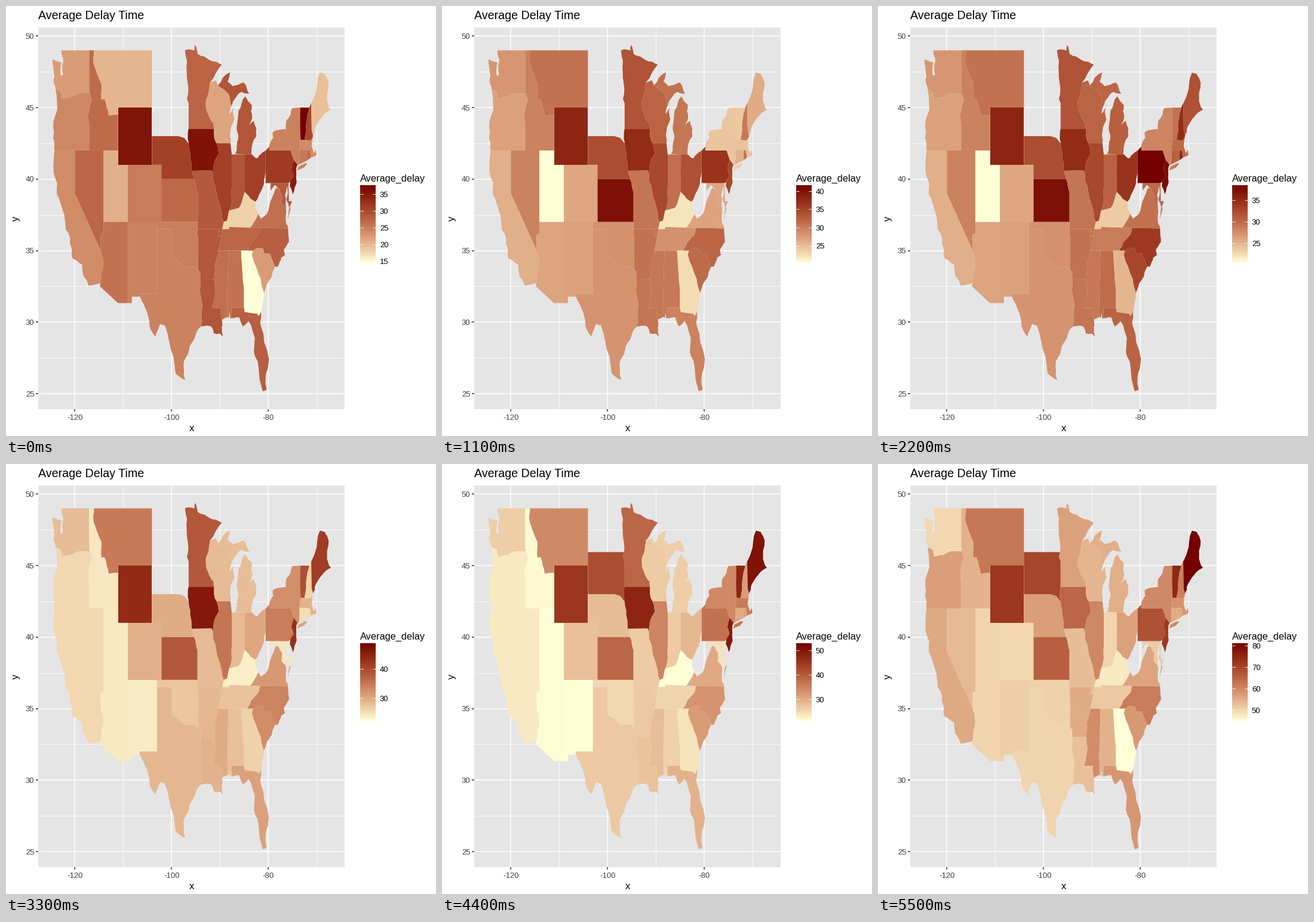
These frames come from a looping animation (720 px wide and 720 px high, 6600 ms). A matplotlib script:

```python
import numpy as np
import matplotlib.pyplot as plt
from matplotlib.animation import FuncAnimation
from matplotlib.collections import LineCollection
from matplotlib.patches import Polygon, Rectangle

SIZE, DPI = 720, 100
BAR = (593, 619, 430, 300)  # left, right, bottom, top of the colour bar

# lowest delay, highest delay, legend step for each period
PERIODS = [(14.46, 37.7, 5), (20.4, 41.6, 5), (20.4, 38.5, 5),
           (22.4, 48.7, 10), (21.2, 52.9, 10), (45.0, 81.1, 10)]

rng = np.random.default_rng(7)
plt.rcParams["font.family"] = "Liberation Sans"
fig = plt.figure(figsize=(SIZE / DPI, SIZE / DPI), dpi=DPI, facecolor="white")
ax = fig.add_axes([0, 0, 1, 1])
ax.axis("off")


def px(lon):
    return 277.1 + 8.09 * (lon + 100)


def py(lat):
    return 50.3 + 23.95 * (50 - lat)


# ---- colour scale: light yellow to dark red through Lab ----
RGB_XYZ = np.array([[.4124, .3576, .1805], [.2126, .7152, .0722], [.0193, .1192, .9505]])
WHITE = RGB_XYZ.sum(axis=1)


def to_lab(rgb):
    c = np.array(rgb) / 255
    lin = np.where(c > .04045, ((c + .055) / 1.055) ** 2.4, c / 12.92)
    t = RGB_XYZ @ lin / WHITE
    f = np.where(t > .008856, np.cbrt(t), 7.787 * t + 16 / 116)
    return np.array([116 * f[1] - 16, 500 * (f[0] - f[1]), 200 * (f[1] - f[2])])


def to_rgb(lab):
    fy = (lab[0] + 16) / 116
    f = np.array([fy + lab[1] / 500, fy, fy - lab[2] / 200])
    t = np.where(f > .2069, f ** 3, (f - 16 / 116) / 7.787)
    lin = np.clip(np.linalg.solve(RGB_XYZ, t * WHITE), 0, 1)
    return np.where(lin > .0031308, 1.055 * lin ** (1 / 2.4) - .055, 12.92 * lin)


LOW, HIGH = to_lab((255, 255, 224)), to_lab((139, 0, 0))


def shade(percent):
    t = np.clip(percent / 100, 0, 1)
    return np.clip(to_rgb(LOW + (HIGH - LOW) * t), 0, 1) ** 1.3


# ---- borders: a few lon, lat key points, roughened by rule ----
def line(*v):
    lon, lat = np.reshape(v, (-1, 2)).T
    return np.c_[px(lon), py(lat)]


def ragged(p, amount, rounds=2):
    """Split every stretch in two and push the new point sideways."""
    for _ in range(rounds):
        step = np.diff(p, axis=0)
        normal = step[:, ::-1] * (-1, 1)
        mid = (p[1:] + p[:-1]) / 2 + normal * rng.uniform(-amount, amount, (len(step), 1))
        out = np.empty((2 * len(p) - 1, 2))
        out[::2], out[1::2] = p, mid
        p = out
    return p


def coast(*v):
    return ragged(line(*v), .1)


def river(*v):
    return ragged(line(*v), .06)


def box(west, north, east, south):
    return line(west, north, east, north, east, south, west, south)


def back(chain):
    return chain[::-1]


def ramp(x, a, b):
    return np.clip((x - a) / (b - a), 0, 1)


areas = []


def area(keys, *chains, start=0):
    """Keys are percent shades: first, early pair, late pair, last period.
    Within a pair the east darkens over time."""
    pts = np.vstack(chains)
    first, early, late, last = keys
    x = pts[:, 0].mean()
    d, e = 18 * ramp(x, 360, 520), 13 * ramp(x, 450, 500) - 3
    levels = (first, early - d, early + d, late - e, late + e, last)
    patch = ax.add_patch(Polygon(pts, lw=0, zorder=3))
    areas.append((patch, start, [shade(v) for v in levels]))


# West
sound = coast(-122.76, 49, -122.4, 48.2, -122.4, 47.3, -122.9, 47.2, -122.75, 48.15,
              -124.6, 48.37)
wa_coast = coast(-124.6, 48.37, -124.2, 47.2, -123.95, 46.25)
columbia = river(-123.95, 46.25, -122.9, 46.1, -122.6, 45.6, -120.6, 45.75, -118.98, 46)
wa_id = line(-117.03, 49, -117.03, 46.4, -116.92, 46)
or_coast = coast(-123.95, 46.25, -124.1, 44.4, -124.5, 42.85, -124.2, 42)
or_id = river(-116.92, 46, -116.5, 45.55, -117.2, 44.45, -117.03, 43.8)
ca_coast = coast(-124.2, 42, -124.4, 40.45, -123.7, 38.9, -122.5, 37.8, -121.9, 36.5,
                 -120.65, 35.15, -120.5, 34.45, -118.5, 34.03, -117.12, 32.53)
ca_nv = line(-120, 42, -120, 39, -114.63, 35)
ca_az = river(-114.72, 32.72, -114.5, 33.4, -114.15, 34.25, -114.63, 35)
nv_az = line(-114.63, 35, -114.7, 36.1, -114.05, 36.2, -114.05, 37)
id_mt = river(-116.05, 49, -116.05, 48, -114.5, 46.65, -114.5, 45.55, -113.9, 45.6,
              -113, 44.45, -111.05, 44.5)

area((34, 36, 19, 13), sound, wa_coast, columbia, back(wa_id))
area((42, 32, 10, 33), columbia, or_id, line(-117.03, 42), back(or_coast))
area((40, 27, 10, 29), ca_coast, ca_az, back(ca_nv))
area((55, 44, 10, 23), ca_nv, nv_az, line(-114.05, 42))
area((53, 44, 5, 26), wa_id, or_id, line(-117.03, 42, -111.05, 42), back(id_mt))
area((25, 50, 44, 48), id_mt, line(-111.05, 45, -104.05, 45, -104.05, 49))
area((92, 84, 79, 76), box(-111.05, 45, -104.05, 41))
area((27, 0, 4, 14), line(-114.05, 42, -111.05, 42, -111.05, 41),
     line(-109.05, 41, -109.05, 37, -114.05, 37))
area((46, 30, 24, 13), box(-109.05, 41, -102.05, 37))
area((50, 31, 4, 14), line(-114.05, 37, -109.05, 37, -109.05, 31.33, -111.07, 31.33,
                           -114.81, 32.5), ca_az, nv_az)
area((44, 32, 3, 16), line(-109.05, 37, -103, 37, -103, 32, -106.62, 32, -106.53, 31.78,
                           -108.2, 31.78, -108.2, 31.33, -109.05, 31.33))

# Plains
ne_sd = river(-98.5, 43, -97.3, 42.86, -96.45, 42.48)
ne_ia = river(-96.45, 42.48, -95.9, 41.2, -95.77, 40.58)
ne_mo = line(-95.77, 40.58, -95.3, 40)
ks_mo = river(-95.3, 40, -95, 39.6, -94.62, 39.1)
ok_ar = line(-94.62, 36.5, -94.43, 35.4, -94.48, 33.64)
red_river = river(-100, 34.56, -98.1, 34.1, -97.2, 33.85, -95.2, 33.9, -94.48, 33.64)
rio = river(-106.53, 31.78, -105, 30.65, -104.4, 29.55, -103.3, 29, -102.35, 29.87,
            -101.4, 29.78, -99.55, 27.55, -99.1, 26.4, -97.15, 25.95)
tx_coast = coast(-97.15, 25.95, -97.4, 27.3, -94.75, 29.35, -93.85, 29.7)
tx_ar = line(-94.48, 33.64, -94.04, 33.55, -94.04, 33.02)
tx_la = river(-94.04, 33.02, -94.02, 32, -93.55, 31.2, -93.85, 29.7)
nd_mn = river(-97.2, 49, -96.85, 47.5, -96.56, 45.94)
sd_mn = line(-96.56, 45.94, -96.8, 45.6, -96.45, 45.3, -96.45, 43.5)
sd_ia = river(-96.45, 43.5, -96.6, 43, -96.45, 42.48)

area((71, 66, 25, 33), line(-104.05, 43), ne_sd, ne_ia, ne_mo,
     line(-102.05, 40, -102.05, 41, -104.05, 41))
area((54, 94, 58, 58), line(-102.05, 40), ks_mo, line(-94.62, 37, -102.05, 37))
area((45, 38, 16, 15), line(-103, 37, -94.62, 37), ok_ar, back(red_river),
     line(-100, 36.5, -103, 36.5))
area((44, 37, 21, 14), line(-103, 36.5, -100, 36.5), red_river, tx_ar, tx_la,
     back(tx_coast), back(rio), line(-106.62, 32, -103, 32))
area((0, 0, 69, 69), line(-104.05, 45.94), sd_mn, sd_ia, back(ne_sd),
     line(-104.05, 43), start=4)

# Mississippi valley and lakes
mn_north = coast(-97.2, 49, -95.15, 49, -95.15, 49.38, -94.6, 48.75, -92, 48.3,
                 -89.6, 48, -92.05, 46.75)
mn_wi = river(-92.05, 46.75, -92.3, 46.1, -92.85, 45.6, -92.75, 44.8, -91.25, 43.85,
              -91.22, 43.5)
ia_wi = river(-91.22, 43.5, -91.1, 42.8, -90.64, 42.5)
ia_il = river(-90.64, 42.5, -90.2, 41.8, -91.1, 41.2, -91.42, 40.38)
ia_mo = line(-91.42, 40.38, -91.73, 40.6, -95.77, 40.58)
il_mo = river(-91.42, 40.38, -91.4, 39.9, -90.65, 38.9, -90.2, 38.4, -89.5, 37.3, -89.15, 37)
bootheel = line(-89.15, 37, -89.5, 36.5, -89.7, 36, -90.37, 36, -90.15, 36.5)
ar_tn = river(-89.7, 36, -90.3, 35)
ar_ms = river(-90.3, 35, -91.05, 34, -91.15, 33)
la_ms = river(-91.15, 33, -90.9, 32.3, -91.6, 31)
pearl = line(-89.75, 31, -89.8, 30.6, -89.55, 30.18)
la_coast = coast(-93.85, 29.7, -91.8, 29.7, -91.2, 29.2, -90.1, 29.2, -89.4, 29,
                 -89.6, 29.6, -89.55, 30.18)
wi_mi = river(-90.4, 46.55, -88.1, 45.9, -87.6, 45.1)
wi_lake = coast(-87.6, 45.1, -88, 44.55, -87.05, 45.25, -87.9, 43.1, -87.8, 42.5)
il_in = river(-87.53, 39.35, -87.5, 38.5, -88.05, 37.8)
il_ky = river(-89.15, 37, -88.5, 37.1, -88.05, 37.8)
in_ky = river(-88.05, 37.8, -86, 38, -84.82, 39.1)
oh_ky = river(-84.82, 39.1, -83.7, 38.65, -82.6, 38.42)
oh_lake = coast(-83.45, 41.73, -82.2, 41.45, -80.52, 41.98)
oh_east = river(-80.52, 40.63, -80.85, 39.7, -82.2, 38.6, -82.6, 38.42)

area((56, 63, 58, 32), mn_north, mn_wi, back(sd_mn), back(nd_mn))
area((93, 81, 87, 55), ia_wi, ia_il, ia_mo, back(ne_ia), back(sd_ia))
area((60, 49, 20, 22), back(ia_mo), il_mo, bootheel, line(-94.62, 36.5, -94.62, 37),
     back(ks_mo), back(ne_mo))
area((61, 50, 21, 28), ok_ar, tx_ar, line(-94.04, 33), back(ar_ms), back(ar_tn),
     line(-90.37, 36, -90.15, 36.5))
area((62, 49, 23, 21), tx_la, la_coast, back(pearl), back(la_ms))
area((31, 56, 20, 25), line(-92.05, 46.75, -90.8, 46.9), wi_mi, wi_lake,
     back(ia_wi), back(mn_wi))
area((72, 68, 46, 42), line(-90.64, 42.5, -87.8, 42.5, -87.53, 41.72), il_in,
     back(il_ky), back(il_mo), back(ia_il))
area((63, 54, 20, 14), line(-87.53, 41.72, -84.8, 41.73), back(in_ky), back(il_in))
area((72, 71, 27, 32), line(-84.8, 41.73), oh_lake, oh_east, back(oh_ky))
michigan = (62, 53, 19, 27)
area(michigan, coast(-90.4, 46.55, -87.9, 47.47, -88.4, 46.8, -87.4, 46.5, -85, 46.75,
                     -83.9, 45.97, -85.5, 46.1, -86.7, 45.7, -87.6, 45.1), back(wi_mi))
area(michigan, coast(-86.8, 41.76, -86.2, 42.8, -86.5, 43.6, -86.1, 44.8, -84.75, 45.78,
                     -83.4, 45.2, -83.3, 44.3, -83.9, 43.8, -82.95, 44.07, -82.43, 43,
                     -83.45, 41.73), line(-84.8, 41.73))

# South
ky_wv = river(-82.6, 38.42, -82.5, 37.9, -81.97, 37.54)
ky_va = river(-81.97, 37.54, -82.7, 37.1, -83.7, 36.6)
ky_tn = line(-83.7, 36.6, -88.05, 36.65, -88.07, 36.5, -89.5, 36.5)
tn_nc = river(-84.3, 35, -83.5, 35.57, -82, 36.12, -81.68, 36.59)
ms_al = line(-88.2, 35, -88.45, 31.9, -88.4, 30.37)
al_ga = line(-85.6, 35, -85.2, 32.87, -85, 32.3, -85, 31)
al_fl = line(-87.5, 30.28, -87.6, 31, -85, 31)
ga_fl = line(-85, 31, -84.86, 30.7, -82.2, 30.57, -82, 30.4, -81.45, 30.71)
fl_coast = coast(-87.5, 30.28, -86, 30.35, -85.2, 29.7, -84.1, 30.08, -82.75, 28.9,
                 -82.7, 27.6, -81.8, 26.1, -81.1, 25.15, -80.3, 25.3, -80.03, 26.8,
                 -81, 29.2, -81.45, 30.71)
ga_sc = river(-83.1, 35, -83.35, 34.7, -81.5, 33, -80.87, 32.05)
nc_sc = line(-83.1, 35, -82.3, 35.2, -81.05, 35.15, -80.8, 34.82, -79.67, 34.8, -78.55, 33.87)
nc_coast = coast(-75.87, 36.55, -75.7, 35.6, -76.7, 35.1, -76.5, 34.7, -77.3, 34.5,
                 -78, 33.87, -78.55, 33.87)
wv_va = river(-81.97, 37.54, -81.5, 37.22, -80.3, 37.55, -79.5, 38.45, -78.35, 39.4,
              -77.75, 39.3)
potomac = river(-77.75, 39.3, -77.05, 38.85, -77.25, 38.35, -76.3, 37.95)

area((15, 13, 2, 7), line(-89.5, 36.5), il_ky, in_ky, oh_ky, ky_wv, ky_va, ky_tn)
area((55, 42, 17, 18), back(ky_tn), back(tn_nc), back(ar_tn))
area((52, 48, 25, 40), ms_al, back(pearl), back(la_ms), back(ar_ms))
area((50, 50, 18, 26), line(-88.2, 35), al_ga, back(al_fl),
     line(-87.8, 30.25, -88, 30.7, -88.1, 30.3), back(ms_al))
area((0, 18, 12, 0), al_ga[:1], ga_sc, coast(-80.87, 32.05, -81.45, 30.71),
     back(ga_fl), back(al_ga))
area((58, 50, 29, 36), al_fl, ga_fl, back(fl_coast))
area((34, 61, 37, 35), nc_sc, coast(-78.55, 33.87, -79.2, 33.2, -80.87, 32.05), back(ga_sc))
area((58, 65, 40, 46), tn_nc, nc_coast, back(nc_sc))
virginia = (51, 41, 32, 31)
area(virginia, back(ky_va), wv_va, potomac,
     coast(-76.3, 37.95, -76.3, 36.95, -75.87, 36.55), line(-81.68, 36.59))
area(virginia, line(-75.95, 37.15, -75.65, 37.95, -75.3, 38.02))
area((60, 42, 9, 17), line(-79.48, 39.72, -75.79, 39.72, -75.7, 38.46, -75.05, 38.45),
     coast(-75.65, 37.95, -76.2, 38.6, -76, 39.55, -76.5, 38.9, -76.4, 38.3),
     back(potomac), line(-78.6, 39.6, -79.48, 39.2))

# Northeast
pa_ny = line(-79.76, 42.27, -79.76, 42, -75.35, 42, -74.7, 41.36)
pa_nj = river(-74.7, 41.36, -75.2, 40.7, -74.75, 40.2, -75.42, 39.8)
ny_vt = line(-73.35, 45, -73.4, 43.7, -73.27, 42.75)
ny_ct = line(-73.5, 42.05, -73.5, 41.3, -73.65, 41)
vt_nh = river(-71.5, 45, -72.05, 44.1, -72.47, 42.73)
nh_me = line(-71.08, 45.3, -70.98, 43.4, -70.7, 43.05)
ma_nh = line(-72.47, 42.73, -71.3, 42.7, -70.8, 42.87)

area((74, 90, 48, 64), line(-80.52, 41.98), pa_ny, pa_nj,
     line(-75.79, 39.72, -80.52, 39.72))
area((88, 82, 84, 75), line(-74.7, 41.36),
     coast(-73.9, 41, -74.2, 40.5, -74.1, 39.75, -74.9, 38.95, -75.5, 39.5), back(pa_nj))
new_york = (44, 31, 40, 41)
area(new_york, coast(-79.76, 42.27, -78.9, 42.9, -79.05, 43.27, -76.3, 43.5, -76.2, 44.1,
                     -75, 44.97), ny_vt, ny_ct, line(-73.9, 41), back(pa_ny))
area(new_york, line(-74, 40.6, -73.7, 40.88, -72.3, 41.12, -71.9, 41.07, -72.6, 40.8))
area((100, 34, 75, 83), line(-73.35, 45), vt_nh, back(ny_vt))
area((68, 64, 24, 45), line(-71.5, 45), nh_me, back(ma_nh), back(vt_nh))
area((21, 46, 83, 100),
     coast(-71.08, 45.3, -70.3, 45.9, -69.25, 47.45, -68.3, 47.35, -67.8, 47.07,
           -67.8, 45.7, -67, 44.85, -68.8, 44.35, -70.25, 43.6, -70.7, 43.05), back(nh_me))
area((40, 37, 36, 37), line(-73.27, 42.75), ma_nh,
     line(-71, 42.3, -70.5, 41.8, -70.1, 42.05, -70, 41.67, -71.13, 41.5, -71.38, 42.02,
          -73.5, 42.05))
area((55, 66, 22, 30), line(-71.8, 42.02, -71.38, 42.02, -71.13, 41.5, -71.86, 41.32))
area((48, 42, 20, 28), line(-71.8, 42.02, -71.86, 41.32), back(ny_ct))


# ---- panel, axes and legend ----
def label(x, y, s, size, color="black", **kw):
    kw.setdefault("va", "baseline")
    return ax.text(x, y, s, fontsize=size * 72 / DPI, color=color, **kw)


def rule(xs, ys, width, color="white"):
    ax.plot(xs, ys, color=color, lw=width * 72 / DPI, solid_capstyle="butt", zorder=2)


L, R, T, B = 54, 567, 36, 675
ax.add_patch(Rectangle((L, T), R - L, B - T, color="#e5e5e5", lw=0, zorder=1))
for lon in range(-120, -69, 10):
    x, major = px(lon), lon % 20 == 0
    rule([x, x], [T, B], 1.6 if major else .8)
    if major:
        rule([x, x], [B, B + 4], 1.5, "#333333")
        label(x, 693, str(lon), 13.1, "#424242", ha="center")
for lat in np.arange(25, 50.1, 2.5):
    y, major = py(lat), lat % 5 == 0
    rule([L, R], [y, y], 1.6 if major else .8)
    if major:
        rule([L - 4, L], [y, y], 1.5, "#333333")
        label(47.5, y + 4.7, f"{lat:.0f}", 13.1, "#424242", ha="right")

label(54, 22, "Average Delay Time", 19.7)
label(310.5, 712, "x", 16.4, ha="center")
label(16, 355.5, "y", 16.4, ha="center", va="center", rotation=90)
label(593, 294, "Average_delay", 16.4)

colors = np.array([[shade(p)] for p in np.linspace(100, 0, 130)])
ax.imshow(colors, extent=BAR, aspect="auto", interpolation="nearest", zorder=3)
marks = ax.add_collection(LineCollection([], colors="white", linewidths=.6, zorder=4))
breaks = [label(626, 0, "", 13.1) for _ in range(5)]
ax.set_xlim(0, SIZE)
ax.set_ylim(SIZE, 0)


def draw(i):
    for patch, start, shades in areas:
        patch.set_visible(i >= start)
        patch.set_facecolor(shades[i])
    low, high, step = PERIODS[i]
    left, right, bottom, top = BAR
    values = np.arange(np.ceil(low / step) * step, high, step)
    segs = []
    for text in breaks:
        text.set_visible(False)
    for text, v in zip(breaks, values):
        y = bottom + (v - low) / (high - low) * (top - bottom)
        text.set(text=f"{v:.0f}", y=y + 4.7, visible=True)
        segs += [[(left, y), (left + 5, y)], [(right - 5, y), (right, y)]]
    marks.set_segments(segs)
    return []


anim = FuncAnimation(fig, draw, frames=len(PERIODS), interval=1100, repeat=True,
                     repeat_delay=0, init_func=lambda: draw(0))
plt.show()
```
